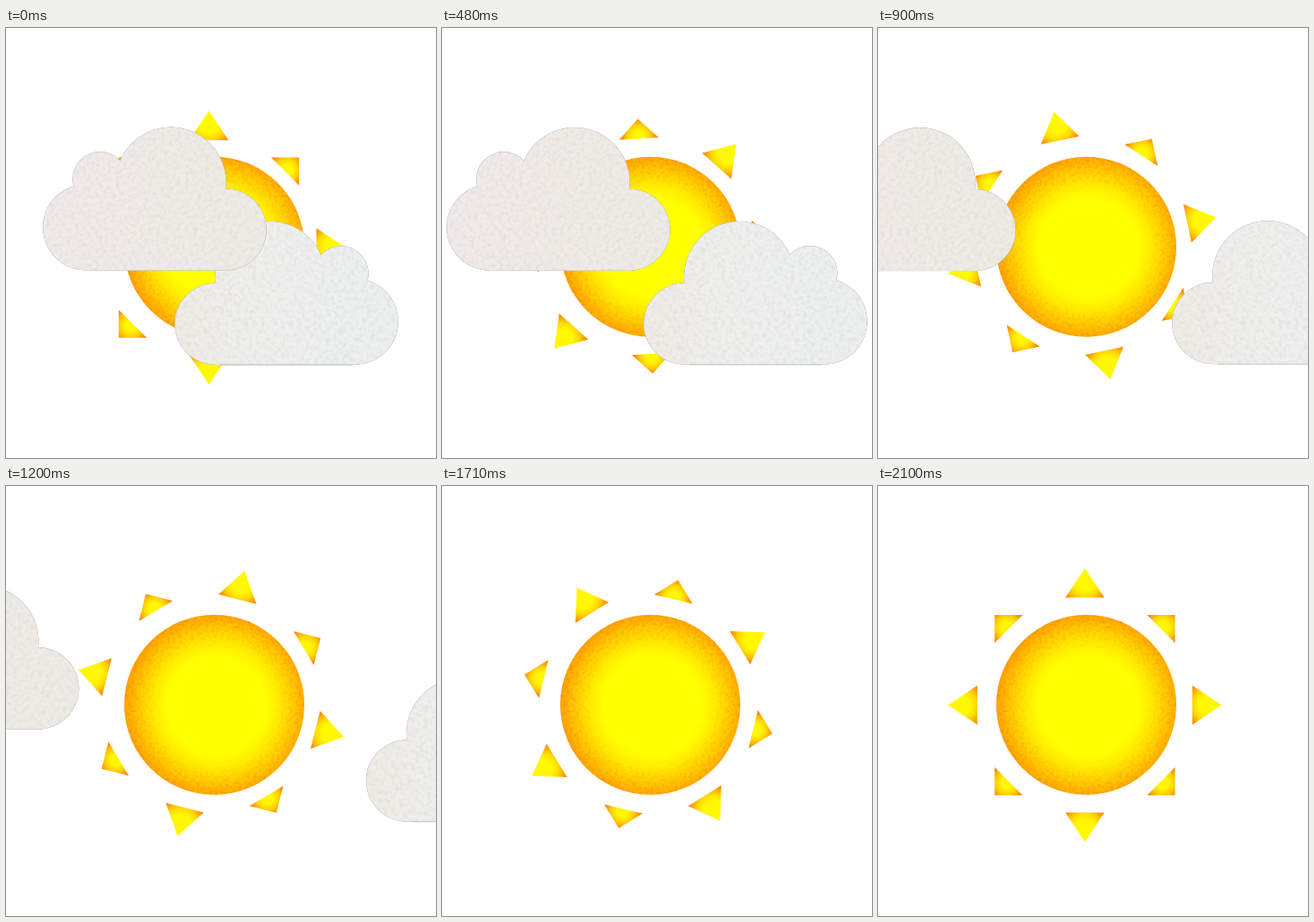
Recreate the animation shown at these times as an HTML page. Size 480 by 480 pixels, loop 2130 ms.

```html
<!DOCTYPE html>
<html lang="en">
<head>
<meta charset="utf-8">
<title>Sun and clouds</title>
<style>
  html, body { margin: 0; width: 100%; height: 100%; overflow: hidden; background: #fff; }
  svg { display: block; width: 100vw; height: 100vh; }
</style>
</head>
<body>
<svg viewBox="0 0 480 480">
  <defs>
    <radialGradient id="sunFill" gradientUnits="userSpaceOnUse" cx="235" cy="245" r="104">
      <stop offset=".52" stop-color="#ffff00"/>
      <stop offset=".68" stop-color="#ffec00"/>
      <stop offset=".84" stop-color="#ffcb00"/>
      <stop offset="1" stop-color="#ffa000"/>
    </radialGradient>
    <radialGradient id="sunGrain" gradientUnits="userSpaceOnUse" cx="235" cy="245" r="104">
      <stop offset=".6" stop-color="#000" stop-opacity="0"/>
      <stop offset="1" stop-color="#000" stop-opacity=".6"/>
    </radialGradient>
    <radialGradient id="bigFill" gradientUnits="userSpaceOnUse" cx="0" cy="-139" r="28">
      <stop offset=".4" stop-color="#fff800"/>
      <stop offset=".65" stop-color="#ffd800"/>
      <stop offset="1" stop-color="#fa8000"/>
    </radialGradient>
    <radialGradient id="smallFill" gradientUnits="userSpaceOnUse" cx="0" cy="-123" r="21">
      <stop offset=".3" stop-color="#fff600"/>
      <stop offset=".6" stop-color="#ffd000"/>
      <stop offset="1" stop-color="#fa7600"/>
    </radialGradient>
    <linearGradient id="warm" gradientUnits="userSpaceOnUse" x1="41" y1="0" x2="291" y2="0">
      <stop stop-color="#f0ebe9"/>
      <stop offset="1" stop-color="#eeebe7"/>
    </linearGradient>
    <linearGradient id="cool" gradientUnits="userSpaceOnUse" x1="41" y1="0" x2="291" y2="0">
      <stop stop-color="#ecf0f0"/>
      <stop offset=".6" stop-color="#eef0ee"/>
      <stop offset="1" stop-color="#f0ece8"/>
    </linearGradient>
    <filter id="ember" x="0" y="0" width="1" height="1" color-interpolation-filters="sRGB">
      <feTurbulence type="fractalNoise" baseFrequency=".3" numOctaves="2" seed="4"/>
      <feColorMatrix values="0 0 0 0 .96  0 0 0 0 .47  0 0 0 0 0  2 0 0 0 -.8"/>
      <feComposite in2="SourceAlpha" operator="in"/>
    </filter>
    <filter id="paper" x="0" y="0" width="1" height="1" color-interpolation-filters="sRGB">
      <feTurbulence type="fractalNoise" baseFrequency=".22" numOctaves="3" seed="9"/>
      <feColorMatrix values="0 0 0 0 .8  0 0 0 0 .77  0 0 0 0 .74  .7 0 0 0 -.3"/>
      <feComposite in2="SourceAlpha" operator="in"/>
    </filter>
    <path id="big" d="M0-152.7L21.8-120H-21.8Z" fill="url(#bigFill)"/>
    <path id="small" d="M0-142.3L22-120.3H-22Z" fill="url(#smallFill)"/>
    <g id="cloud">
      <circle cx="89" cy="222.5" r="47.7"/>
      <circle cx="105" cy="168.7" r="30.5"/>
      <circle cx="184" cy="172.3" r="61.5"/>
      <circle cx="245" cy="225" r="45.5"/>
      <path d="M89 172H245V270.5H89Z"/>
    </g>
  </defs>
  <g id="rays"></g>
  <circle cx="232.5" cy="244.2" r="100.5" fill="url(#sunFill)"/>
  <circle cx="232.5" cy="244.2" r="100.5" fill="url(#sunGrain)" filter="url(#ember)"/>
  <g id="rightCloud">
    <g transform="translate(479 105.3) scale(-1 1)">
      <use href="#cloud" stroke="#d9dcdb" stroke-width=".7"/>
      <use href="#cloud" fill="url(#cool)"/>
      <use href="#cloud" filter="url(#paper)"/>
      <path d="M92 270.8H240" stroke="#b9bfc0" stroke-width=".8"/>
    </g>
  </g>
  <g id="leftCloud">
    <use href="#cloud" stroke="#dcd8d5" stroke-width=".7"/>
    <use href="#cloud" fill="url(#warm)"/>
    <use href="#cloud" filter="url(#paper)"/>
    <path d="M74 176Q78 200 94 219T108 258" fill="none" stroke="#e5e2e1"/>
  </g>
</svg>
<script>
  const LOOP = 2130, STEP = 30;
  const CLOUD_DELAY = 330;
  const DEG_PER_MS = 0.0868;
  const byId = id => document.getElementById(id);
  const rays = byId('rays');

  rays.innerHTML = Array.from({ length: 8 }, (_, i) =>
    `<use href="#${i % 2 ? 'small' : 'big'}" transform="rotate(${i * 45})"/>`).join('');

  const move = (id, x, y) => byId(id).setAttribute('transform', `translate(${x} ${y})`);

  function draw(t) {
    // The ring of rays sits slightly off its pivot, so it wobbles as it turns.
    const angle = Math.min(180, t * DEG_PER_MS);
    rays.setAttribute('transform', `translate(228.7 244.9) rotate(${angle}) translate(-2.2 .3)`);

    const drift = Math.max(0, t - CLOUD_DELAY);
    move('leftCloud', -0.2405 * drift, 0.001 * drift);
    move('rightCloud', 0.2455 * drift, -0.0015 * drift);
  }

  function tick() {
    const t = performance.now() % LOOP;
    draw(Math.floor(t / STEP) * STEP);
    requestAnimationFrame(tick);
  }

  draw(0);
  requestAnimationFrame(tick);
</script>
</body>
</html>
```
